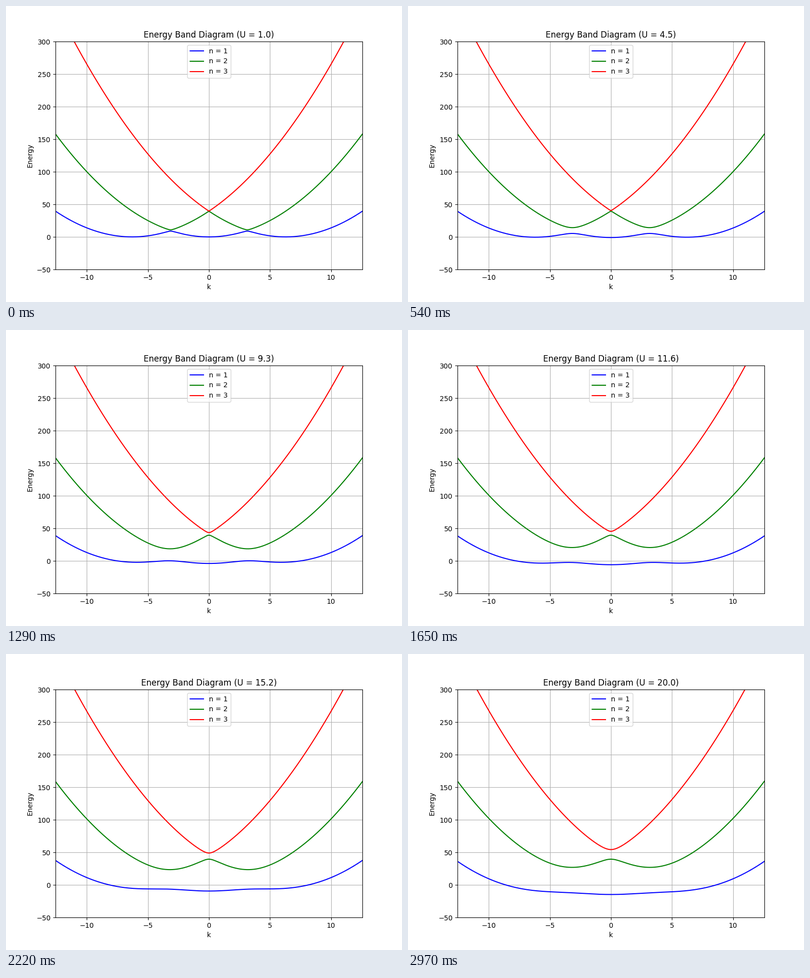
These frames come from a looping animation (800 px wide and 600 px high, 3 s). A matplotlib script:

```python
import numpy as np
import matplotlib.pyplot as plt
from matplotlib.animation import FuncAnimation

FRAMES = 100
INTERVAL = 30  # ms
G = 2 * np.pi  # reciprocal lattice vector

k = np.linspace(-2 * G, 2 * G, 400)
potentials = np.linspace(1, 20, FRAMES)


def band_energies(u):
    """Eigenvalues of the three-plane-wave Hamiltonian for every k."""
    h = np.zeros((k.size, 3, 3))
    for i, shift in enumerate((-G, 0, G)):
        h[:, i, i] = (k + shift) ** 2
    for i in (0, 1):
        h[:, i, i + 1] = h[:, i + 1, i] = u
    return np.linalg.eigvalsh(h).T


plt.rcParams["font.family"] = "DejaVu Sans"
fig, ax = plt.subplots(figsize=(8, 6), dpi=100)
lines = [
    ax.plot([], [], color=color, lw=1.5, label=f"n = {n}")[0]
    for n, color in enumerate(("blue", "green", "red"), 1)
]
ax.set_xlim(k[0], k[-1])
ax.set_ylim(-50, 300)
ax.set_xlabel("k")
ax.set_ylabel("Energy")
ax.grid(True)
ax.legend(loc="upper center")
title = ax.set_title("")


def update(frame):
    u = potentials[frame]
    for line, energy in zip(lines, band_energies(u)):
        line.set_data(k, energy)
    title.set_text(f"Energy Band Diagram (U = {u:.1f})")
    return [*lines, title]


anim = FuncAnimation(fig, update, frames=FRAMES, interval=INTERVAL,
                     repeat=True, repeat_delay=0, blit=False)
plt.show()
```
